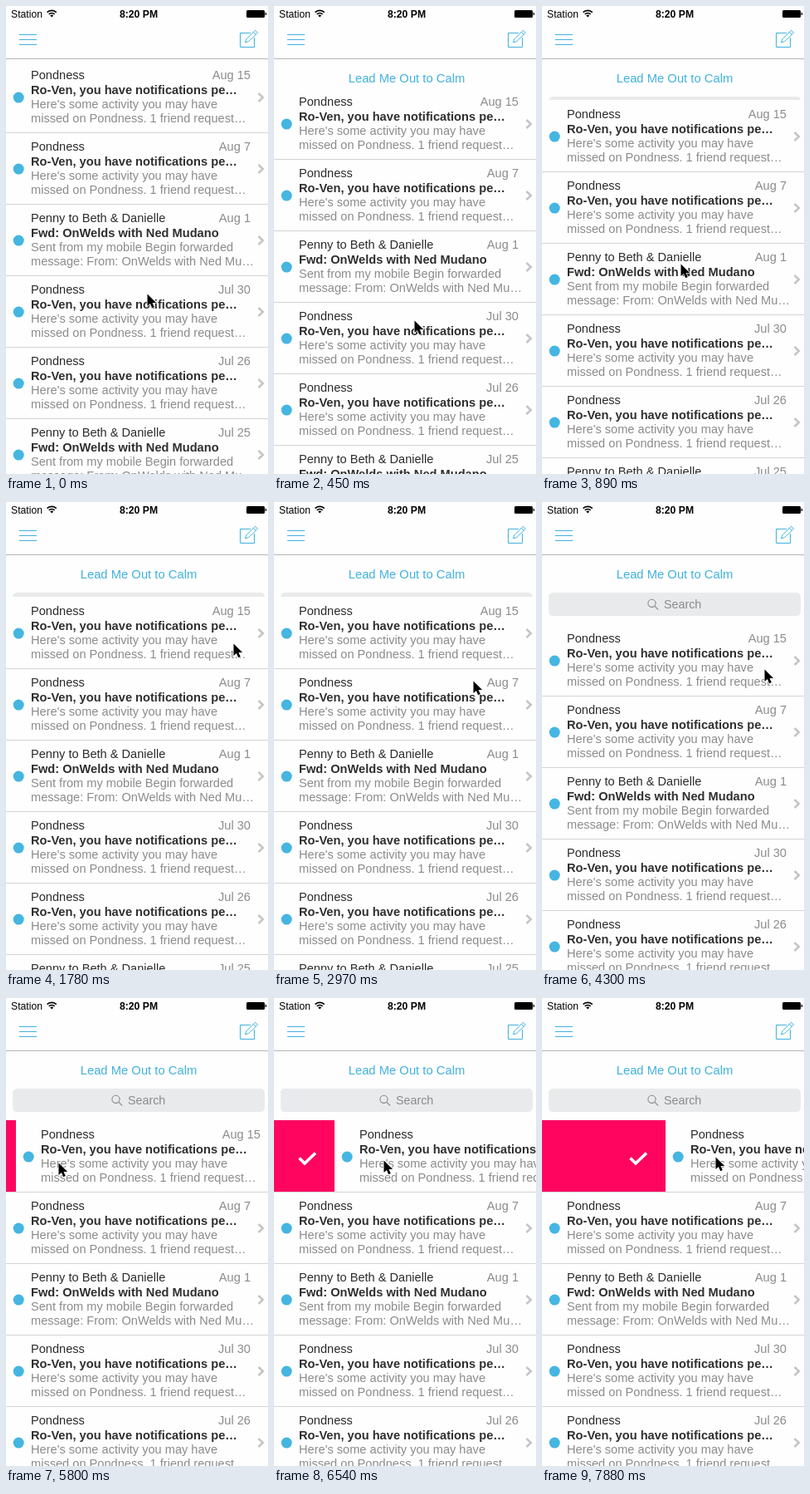
An HTML page that plays this animation: 316x563 px, repeating every 8 s.

```html
<!DOCTYPE html>
<html lang="en">
<head>
<meta charset="utf-8">
<title>Inbox</title>
<style>
  html, body { margin: 0; width: 100%; height: 100%; overflow: hidden; background: #fefefe; }
  svg { display: block; width: 100%; height: 100%; font: 14.6px "Liberation Sans", Arial, sans-serif; }
  .blue { stroke: #42b1de; fill: none; }
  .from { fill: #2b2b2b; }
  .subject { fill: #2f2f2f; font-weight: bold; font-size: 14.65px; }
  .soft { fill: #8b8b8b; }
  .end { text-anchor: end; }
  .mid { text-anchor: middle; }
  .bar { font-size: 12.2px; }
</style>
</head>
<body>
<svg viewBox="0 0 316 563">
  <rect width="316" height="563" fill="#fefefe"/>

  <text class="mid" x="160" y="91.6" fill="#42b1de" font-size="14.8">Lead Me Out to Calm</text>
  <rect x="8" y="109" width="304" height="28" rx="5" fill="#e9eaeb"/>
  <g fill="none" stroke="#8b8b90" stroke-width="1.1">
    <circle cx="132.5" cy="121.8" r="4.6"/>
    <path d="M136 125.3l4.2 4.2"/>
  </g>
  <text x="147" y="128" fill="#8b8b90" font-size="14.3">Search</text>

  <g id="list"><rect width="316" height="563" fill="#fefefe"/></g>

  <rect width="316" height="63" fill="#fefefe"/>
  <path d="M0 63.5H316" stroke="#b4b4b4"/>
  <text class="bar" x="6" y="13.6">Station</text>
  <path d="M49.6 7.6a8 8 0 0 1 11.2 0M51.8 9.9a4.9 4.9 0 0 1 6.8 0"
        fill="none" stroke="#000" stroke-width="1.7"/>
  <path d="M55.2 13.4l-1.9-2a2.7 2.7 0 0 1 3.8 0z"/>
  <text class="bar mid" x="160" y="13.6" font-weight="bold">8:20 PM</text>
  <rect x="290" y="5" width="22" height="9" rx="1.5"/>
  <path d="M312.6 7.7q1.6 .3 1.6 1.8t-1.6 1.8z"/>
  <path class="blue" d="M16 34.5H37M16 40.5H37M16 46.5H37"/>
  <path class="blue" d="M295 32.5H282.5V49.5H299.5V38"/>
  <path class="blue" d="M288.5 43.8l1.4-4L300.5 29.2l3 3L292.7 42.6zM298.3 31.4l3 3"/>

  <path id="cursor" d="M.5 .5v14.6l3.4-3.1 2.3 5.3 2.6-1.2-2.3-5.2h4.6Z"
        stroke="#fff" stroke-width="1.2" paint-order="stroke"/>
</svg>
<script>
const LOOP = 8000, STEP = 148.6, ROW = 86;

const social = {
  from: "Pondness",
  subject: "Ro-Ven, you have notifications pe…",
  body: ["Here's some activity you may have", "missed on Pondness. 1 friend request…"]
};
const forward = {
  from: "Penny to Beth & Danielle",
  subject: "Fwd: OnWelds with Ned Mudano",
  body: ["Sent from my mobile Begin forwarded", "message: From: OnWelds with Ned Mu…"]
};
const dates = ["Aug 15", "Aug 7", "Aug 1", "Jul 30", "Jul 26", "Jul 25"];

// Pointer glides: first step, last step, x, y. It rests in between.
const glides = [
  [0, 4, 168, 388], [4, 6, 167, 310], [6, 8, 279, 169],
  [10, 16, 265, 172], [17, 20, 240, 215], [20, 24, 245, 265],
  [25, 29, 268, 201], [31, 37, 49, 199], [38, 44, 132, 195], [45, 53, 209, 191]
];

const list = document.getElementById("list");
const cursor = document.getElementById("cursor");

function add(parent, tag, attrs, text = "") {
  const el = document.createElementNS("http://www.w3.org/2000/svg", tag);
  for (const key in attrs) el.setAttribute(key, attrs[key]);
  el.textContent = text;
  return parent.appendChild(el);
}

function move(el, x, y) {
  el.setAttribute("transform", `translate(${Math.round(x)} ${Math.round(y)})`);
}

function addRow(date, i) {
  const mail = i % 3 === 2 ? forward : social;
  const row = add(list, "g", {});
  move(row, 0, i * ROW);
  const cell = add(row, "g", {});
  const line = (cls, x, y, text) => add(cell, "text", { class: cls, x, y }, text);
  add(cell, "circle", { cx: 15.2, cy: 44.1, r: 6.5, fill: "#45b5e1" });
  line("from", 30, 22, mail.from);
  line("soft end", 295, 22, date);
  line("subject", 30, 40, mail.subject);
  mail.body.forEach((text, n) => line("soft", 30, 57 + n * 17, text));
  add(cell, "path", {
    d: "M304.5 39l5.3 5-5.3 5", fill: "none", stroke: "#c5c5c7", "stroke-width": 2.6
  });
  add(row, "path", { d: "M0 86.5H316", stroke: "#d3d3d3" });
  return cell;
}

const topCell = dates.map(addRow)[0];
const action = add(list, "g", {});
add(action, "rect", { x: -316, width: 316, height: ROW, fill: "#ff0560" });
add(action, "path", {
  d: "M-42.5 45.5l6.5 6.5 13-12.5", fill: "none", stroke: "#fff", "stroke-width": 3.6
});

const ramp = (step, from, to) => Math.min(1, Math.max(0, (step - from) / (to - from)));
const easeOut = p => 1 - (1 - p) ** 2;

// Pulled open, pulled further, then released.
function listTop(step) {
  return 66 + 48 * easeOut(ramp(step, 0, 7))
    + 41 * ramp(step, 20, 24)
    - 8 * easeOut(ramp(step, 25, 30));
}

function swipe(step) {
  return 73 * ramp(step, 38, 44) + 76 * ramp(step, 45, 53);
}

function pointer(step) {
  return glides.reduce(([x, y], [from, to, endX, endY]) => {
    const p = ramp(step, from, to);
    return [x + (endX - x) * p, y + (endY - y) * p];
  }, [170, 346]);
}

function draw(time) {
  // The picture advances in even, held steps.
  const step = Math.floor((time % LOOP + 10) / STEP);
  move(list, 0, listTop(step));
  move(topCell, swipe(step), 0);
  move(action, swipe(step), 0);
  move(cursor, ...pointer(step));
}

const start = performance.now();
function tick() {
  draw(performance.now() - start);
  requestAnimationFrame(tick);
}
tick();
</script>
</body>
</html>
```
